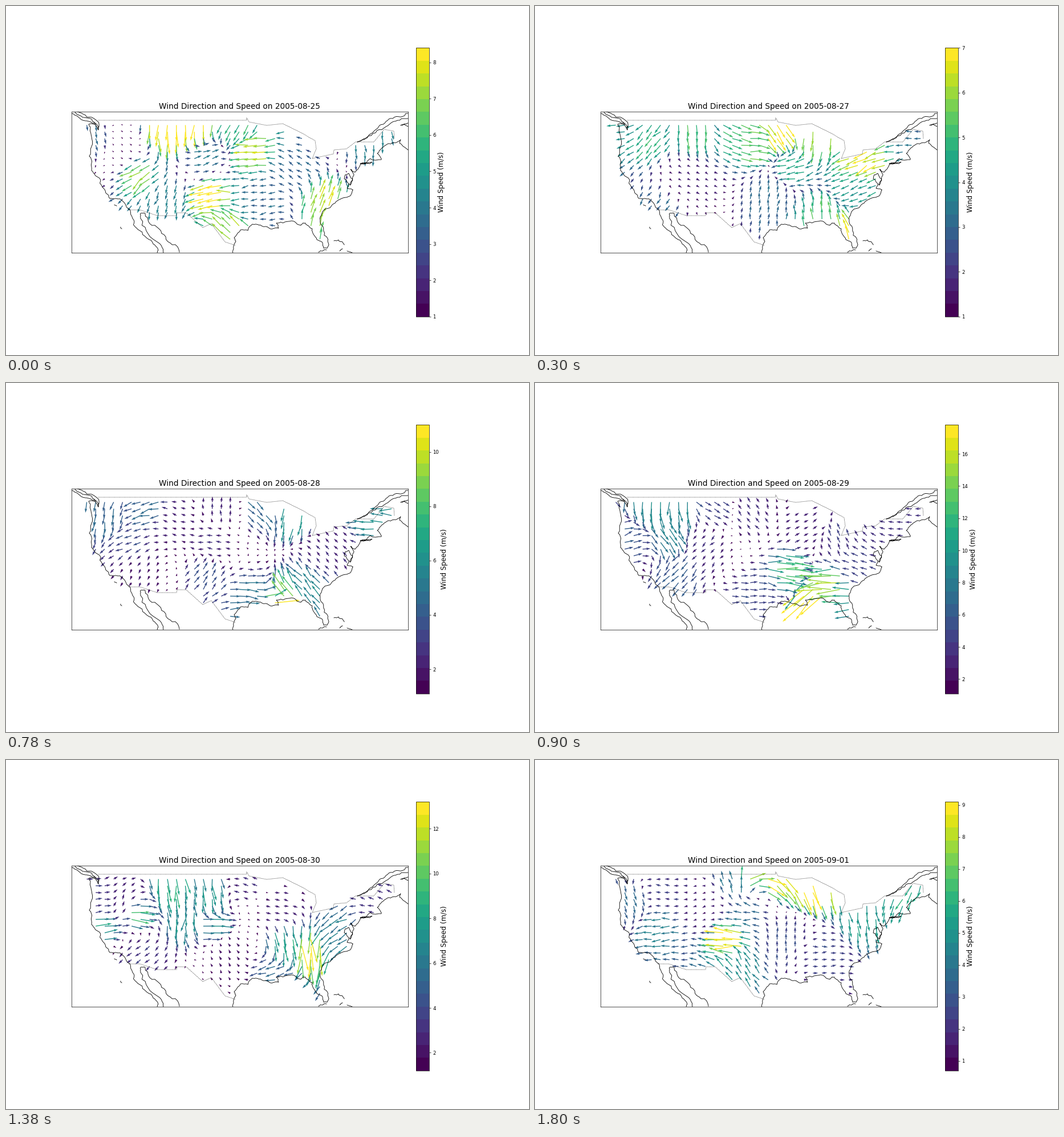
A matplotlib script that plays this animation: 917 px wide and 611 px high, repeating every 2.1 s.

```python
import numpy as np
import matplotlib.pyplot as plt
from matplotlib.animation import FuncAnimation

W, H, DPI = 917, 611, 64
S = W / 15 / DPI  # the layout is that of a 15 inch wide figure
plt.rcParams.update({
    "font.family": "DejaVu Sans", "font.size": 10 * S,
    "axes.linewidth": 0.8 * S, "axes.titlepad": 6 * S, "axes.labelpad": 4 * S,
    "ytick.major.size": 3.5 * S, "ytick.major.width": 0.8 * S,
    "ytick.major.pad": 3.5 * S,
})

LEFT, RIGHT, TOP, BOTTOM = 114.6, 704.5, 185.2, 432.0
X0, Y0, DX, DY = 157.3, 208.5, 15.72, 11.76

# Column spans that lie on land, one entry per grid row
SPANS = [
    [(-1, 18)], [(0, 18), (21, 21), (32, 33)], [(0, 21), (23, 23), (32, 33)],
    [(0, 21), (23, 23), (29, 32)], [(0, 24), (27, 31)], [(0, 31)],
    [(0, 29)], [(0, 28)], [(1, 28)], [(1, 28)], [(2, 28)], [(2, 27)],
    [(3, 26)], [(6, 25)], [(12, 25)], [(12, 17), (20, 20), (24, 25)],
    [(14, 15), (25, 25)], [(15, 15), (25, 25)],
]
GRID = np.array([(c, r) for r, spans in enumerate(SPANS)
                 for a, b in spans for c in range(a, b + 1)], float)

DAYS = []


def day(date, low, high, px, *knots):
    """Spread knots (column, row, dx, dy) over the grid as a wind field."""
    k = np.array(knots, float)
    gap = (GRID[:, None] - k[None, :, :2]) * (1.33, 1)
    # strong winds reach less far than weak ones
    w = ((gap ** 2).sum(2) + 0.05) ** -2 / np.hypot(k[:, 2], k[:, 3])
    d = w @ k[:, 2:] / w.sum(1, keepdims=True)
    rng = np.random.default_rng(len(DAYS))
    turn = rng.normal(0, 0.12, len(d))
    z = (d[:, 0] - 1j * d[:, 1]) * np.exp(1j * turn) * rng.uniform(0.92, 1.08, len(d))
    size = np.clip(abs(z), low * px, high * px)
    z *= size / abs(z)
    DAYS.append((date, low, high, z.real, z.imag, size / px))


day("2005-08-25", 1.0, 8.4, 3.35,
    (0, 2, 2, 12), (3, 3, -3, -3), (7, 0, -3, 26), (8, 1, 3, 28),
    (11, 0, 1, 28), (16, 0, -9, 17), (18, 4, -25, 1), (12, 5, 13, -4),
    (5, 7, -20, 13), (8, 11, -3, 14), (13, 10, -29, 7), (15, 16, -18, -16),
    (22, 7, -10, -6), (19, 11, -12, 2), (25, 12, 8, -24), (31, 2, 1, 14))

day("2005-08-27", 1.0, 7.0, 3.9,
    (-1, 0, -16, 1), (3, 2, -12, 14), (8, 1, 1, 20), (12, 1, 18, 7),
    (17, 1, 17, 22), (14, 3, 22, 2), (21, 2, -1, 23), (19, 6, -17, 5),
    (27, 5, -24, 10), (33, 1, -12, 0), (26, 9, -15, 7), (22, 14, -2, -20),
    (25, 17, -11, -23), (16, 11, 2, -12), (7, 8, 6, 3), (4, 12, -7, 10))

day("2005-08-28", 1.1, 11.0, 4.0,
    (1, 2, -2, 18), (6, 1, -18, 5), (4, 6, -12, 6), (9, 3, -8, -3),
    (14, 1, 1, -10), (18, 1, 13, 13), (22, 2, -5, 24), (13, 6, -10, -1),
    (32, 2, -24, -1), (26, 8, -7, -7), (24, 13, -15, -18), (21, 14, -24, -29),
    (20, 15, 45, -3), (17, 14, 20, 2), (12, 11, 9, -12), (5, 10, -4, 7))

day("2005-08-29", 1.1, 17.8, 2.87,
    (3, 0, 0, 26), (6, 1, 2, 26), (5, 5, 13, 21), (0, 6, 16, -5),
    (6, 10, -12, 13), (10, 1, 12, 7), (9, 6, -7, 7), (14, 2, -6, -9),
    (20, 4, 8, -5), (24, 6, -4, -12), (32, 3, -11, -1), (26, 9, -12, -5),
    (23, 12, -44, 0), (18, 10, 36, 4), (21, 14, -38, 34), (14, 14, 14, 0))

day("2005-08-30", 1.2, 13.2, 3.4,
    (0, 4, 12, 0), (0, 7, 28, -1), (3, 4, 4, -8), (4, 5, 34, 6),
    (8, 1, 4, 28), (13, 2, 4, 25), (17, 1, -10, -3), (20, 4, 9, 2),
    (10, 6, 0, 24), (13, 7, 24, 0), (5, 11, -9, 7), (15, 11, -4, -6),
    (21, 9, 5, 27), (24, 10, -3, 44), (27, 8, -17, 12), (32, 2, -10, -4),
    (20, 14, -16, 6))

day("2005-08-31", 0.6, 9.7, 3.75,
    (0, 4, 13, -5), (3, 2, 4, -3), (6, 0, -5, 16), (8, 1, 2, 26),
    (13, 0, 17, 32), (15, 2, 2, 28), (20, 3, 0, 16), (25, 5, 2, 24),
    (33, 1, -18, 6), (29, 5, 12, 27), (27, 8, 19, 25), (24, 9, 12, 14),
    (19, 11, 1, -6), (13, 11, -13, -12), (9, 7, 3, 8), (4, 10, -11, -2),
    (25, 15, -1, 15))

day("2005-09-01", 0.7, 9.1, 3.9,
    (1, 3, 5, 13), (4, 2, -9, -1), (4, 7, -17, 1), (9, 4, -6, 2),
    (12, 1, -6, -14), (13, 0, 0, -24), (14, 0, 28, -6), (16, 0, 31, 18),
    (18, 0, 17, 28), (21, 1, 11, 36), (14, 5, -14, -3), (12, 9, -36, 0),
    (13, 13, -12, -15), (18, 9, 0, -11), (22, 11, 10, 0), (26, 6, 2, 20),
    (32, 2, -10, 19))

fig = plt.figure(figsize=(W / DPI, H / DPI), dpi=DPI, facecolor="white")
ax = fig.add_axes([LEFT / W, 1 - BOTTOM / H, (RIGHT - LEFT) / W, (BOTTOM - TOP) / H])
ax.set(xlim=(LEFT, RIGHT), ylim=(BOTTOM, TOP), xticks=[], yticks=[])
rough = np.random.default_rng(5)


def coast(*pts):
    """Outline with fine bends from midpoint displacement."""
    p = np.array(pts, float)
    for _ in range(3):
        step = np.diff(p, axis=0)
        bend = rough.normal(0, 0.1, (len(step), 1))
        q = np.empty((2 * len(p) - 1, 2))
        q[::2] = p
        q[1::2] = p[:-1] + step / 2 + step[:, ::-1] * (-1, 1) * bend
        p = q
    ax.plot(*p.T, color="black", lw=S, zorder=3)


def border(*pts):
    ax.plot(*np.array(pts).T, color="black", lw=S, ls=":", zorder=3)


# Pacific side
coast((125, 185), (141, 194), (163, 205), (162, 217), (157, 208), (145, 207),
      (150, 229), (146, 263), (150, 288), (165, 303), (169, 317), (182, 337),
      (208, 345), (222, 372), (231, 391), (257, 414), (265, 433))
coast((115, 188), (139, 201), (157, 207), (150, 198), (121, 186))
coast((154, 203), (163, 211), (161, 216))
coast((276, 433), (262, 411), (236, 372), (236, 363), (244, 363), (252, 381),
      (280, 404), (304, 431))
coast((190, 348), (194, 350))
coast((201, 387), (203, 390))

# Gulf and Atlantic
coast((398, 433), (403, 412), (400, 406), (411, 392), (432, 382), (455, 386),
      (478, 389), (474, 380), (505, 377), (517, 384), (525, 380), (537, 390),
      (545, 409), (557, 424), (563, 424), (564, 407), (551, 379), (554, 363),
      (572, 348), (591, 336), (604, 332), (608, 322))
coast((608, 322), (598, 319), (602, 312), (593, 302), (601, 293), (603, 314),
      (610, 296), (604, 286), (612, 291), (621, 278), (642, 273), (621, 276),
      (658, 269), (651, 258), (668, 242), (692, 234), (690, 240), (705, 252))
coast((616, 238), (655, 209), (678, 197), (705, 188))
coast((616, 238), (648, 222), (676, 204), (705, 197))
coast((705, 205), (692, 209), (705, 211))
coast((548, 431), (562, 427))
coast((575, 411), (590, 413), (593, 418))
coast((585, 429), (590, 425))
coast((598, 429), (607, 432))

border((162, 200), (422, 200), (422, 196), (426, 203), (457, 209), (485, 206),
       (518, 222), (542, 236), (544, 250), (537, 267), (574, 259), (575, 252),
       (597, 250), (613, 238), (645, 238), (663, 216), (680, 219), (681, 233))
border((215, 357), (235, 357), (265, 367), (299, 367), (300, 362), (316, 362),
       (345, 388), (360, 381), (384, 413), (402, 419))

title = ax.set_title("", fontsize=16 * S)
wind = ax.quiver(X0 + DX * GRID[:, 0], Y0 + DY * GRID[:, 1], *DAYS[0][3:],
                 cmap=plt.get_cmap("viridis", 21), units="dots", width=1.42,
                 scale_units="dots", scale=1, zorder=2)
wind.set_clim(*DAYS[0][1:3])
cax = fig.add_axes([718.7 / W, 0.11, 23.5 / W, 0.77])
fig.colorbar(wind, cax=cax).set_label("Wind Speed (m/s)", fontsize=14 * S)


def update(i):
    date, low, high, u, v, speed = DAYS[i]
    wind.set_UVC(u, v, speed)
    wind.set_clim(low, high)
    title.set_text(f"Wind Direction and Speed on {date}")
    return wind, title


anim = FuncAnimation(fig, update, frames=len(DAYS), interval=300, repeat=True,
                     repeat_delay=0, blit=False)
plt.show()
```
